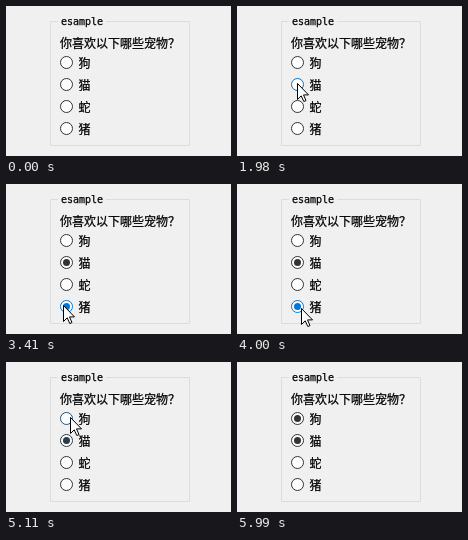
Recreate the animation shown at these times as an HTML page. Size 225x150 px, loop 6530 ms.

```html
<!DOCTYPE html>
<html lang="zh-CN">
<head>
<meta charset="utf-8">
<style>
  html, body { margin: 0; width: 100%; height: 100%; overflow: hidden; background: #f0f0f0; }
  svg { display: block; width: 100%; height: 100%; }
  text { font: 12px "Noto Sans CJK SC", "Noto Sans CJK", sans-serif; stroke: #000; stroke-width: .25; }
  .title { font: 10px "DejaVu Sans Mono", monospace; }
</style>
</head>
<body>
<svg viewBox="0 0 225 150">
  <path d="M52 15.5H44.5V139.5H183.5V15.5H100" fill="none" stroke="#dcdcdc"/>
  <text class="title" x="55" y="19">esample</text>
  <text x="54" y="42">你喜欢以下哪些宠物？</text>
  <g id="options"></g>
  <circle id="click" r="12" fill="#ff0" fill-opacity=".47"/>
  <path id="cursor" d="M.5 .5V16.5L4.2 12.8L6.8 18.5L9 17.6L6.5 11.9H11.5Z" fill="#fff" stroke="#000"/>
</svg>
<script>
const LOOP = 6530, FADE = 150;
const linear = u => u, easeIn = u => u * u, easeOut = u => u * (2 - u), smooth = u => u * u * (3 - 2 * u);

const bursts = [
  [730, 1290, 9], [1560, 2120, 9], [2560, 3060, 9], [3340, 3410, 2],
  [3870, 4000, 3], [4200, 4840, 10], [4900, 5390, 8], [5720, 5990, 5]
];

// Pointer keys: time, x, y, easing towards this key
const path = [
  [730, 119, 100], [1150, 66, 52, easeOut], [1490, 66, 52, linear], [1980, 60, 77, smooth],
  [2500, 60, 77, linear], [2750, 74, 97, easeIn], [3000, 57, 121, easeOut],
  [3800, 57, 121, linear], [4000, 64, 124, smooth], [4560, 64, 124, linear],
  [4840, 83, 86, easeIn], [5110, 64, 55, easeOut], [5650, 64, 55, linear], [5920, 166, 140, easeIn]
];
const clicks = [2050, 3340, 4200, 5320];

const options = [
  { label: "狗", hover: [[1080, 1700], [5040, 5790]], on: [5390, LOOP] },
  { label: "猫", hover: [[880, 1050], [1840, 2700], [4770, 4980]], on: [2120, LOOP] },
  { label: "蛇", hover: [], on: [LOOP, LOOP] },
  { label: "猪", hover: [[2900, 4750]], on: [3410, 4270] }
];

const $ = id => document.getElementById(id);
const clamp = v => Math.max(0, Math.min(1, v));
const show = (el, visible) => el.setAttribute("visibility", visible ? "visible" : "hidden");

function add(parent, tag, attrs) {
  const el = document.createElementNS("http://www.w3.org/2000/svg", tag);
  for (const name in attrs) el.setAttribute(name, attrs[name]);
  return parent.appendChild(el);
}

options.forEach((option, i) => {
  const cy = 56.5 + 22 * i;
  option.ring = add($("options"), "circle", { cx: 60.5, cy, r: 6, fill: "#fff" });
  option.dot = add($("options"), "circle", { cx: 60.5, cy, r: 3.5 });
  add($("options"), "text", { x: 72.5, y: cy + 5.5 }).textContent = option.label;
});

function captured(t) {
  let held = 0;
  for (const [start, end, count] of bursts) {
    if (t < start) break;
    const step = (end - start) / (count - 1);
    held = start + step * Math.min(count - 1, Math.floor((t - start) / step + 0.07));
  }
  return held;
}

function pointer(t) {
  const i = path.findIndex(key => key[0] > t);
  if (i < 1) return i ? path[path.length - 1].slice(1, 3) : path[0].slice(1, 3);
  const [t0, x0, y0] = path[i - 1], [t1, x1, y1, ease] = path[i];
  const u = ease((t - t0) / (t1 - t0));
  return [Math.round(x0 + (x1 - x0) * u), Math.round(y0 + (y1 - y0) * u)];
}

function tint(u) {
  const mix = to => Math.round(51 + (to - 51) * u);
  return `rgb(${mix(0)},${mix(120)},${mix(215)})`;
}

function draw(now) {
  const t = captured(now % LOOP);
  for (const { ring, dot, hover, on } of options) {
    const heat = hover.reduce((sum, [from, to]) =>
      sum + clamp((t - from) / FADE) - clamp((t - to) / FADE), 0);
    ring.setAttribute("stroke", tint(heat));
    dot.setAttribute("fill", tint(heat));
    dot.setAttribute("opacity", t < on[0] - 5 ? 0 : clamp(1 - (t - on[1]) / FADE));
  }
  const place = `translate(${pointer(t)})`;
  $("cursor").setAttribute("transform", place);
  $("click").setAttribute("transform", place);
  show($("cursor"), t >= 730 && t < 5985);
  show($("click"), clicks.some(time => Math.abs(t - time) < 20));
}

function frame(now) {
  draw(now);
  requestAnimationFrame(frame);
}
draw(0);
requestAnimationFrame(frame);
</script>
</body>
</html>
```
